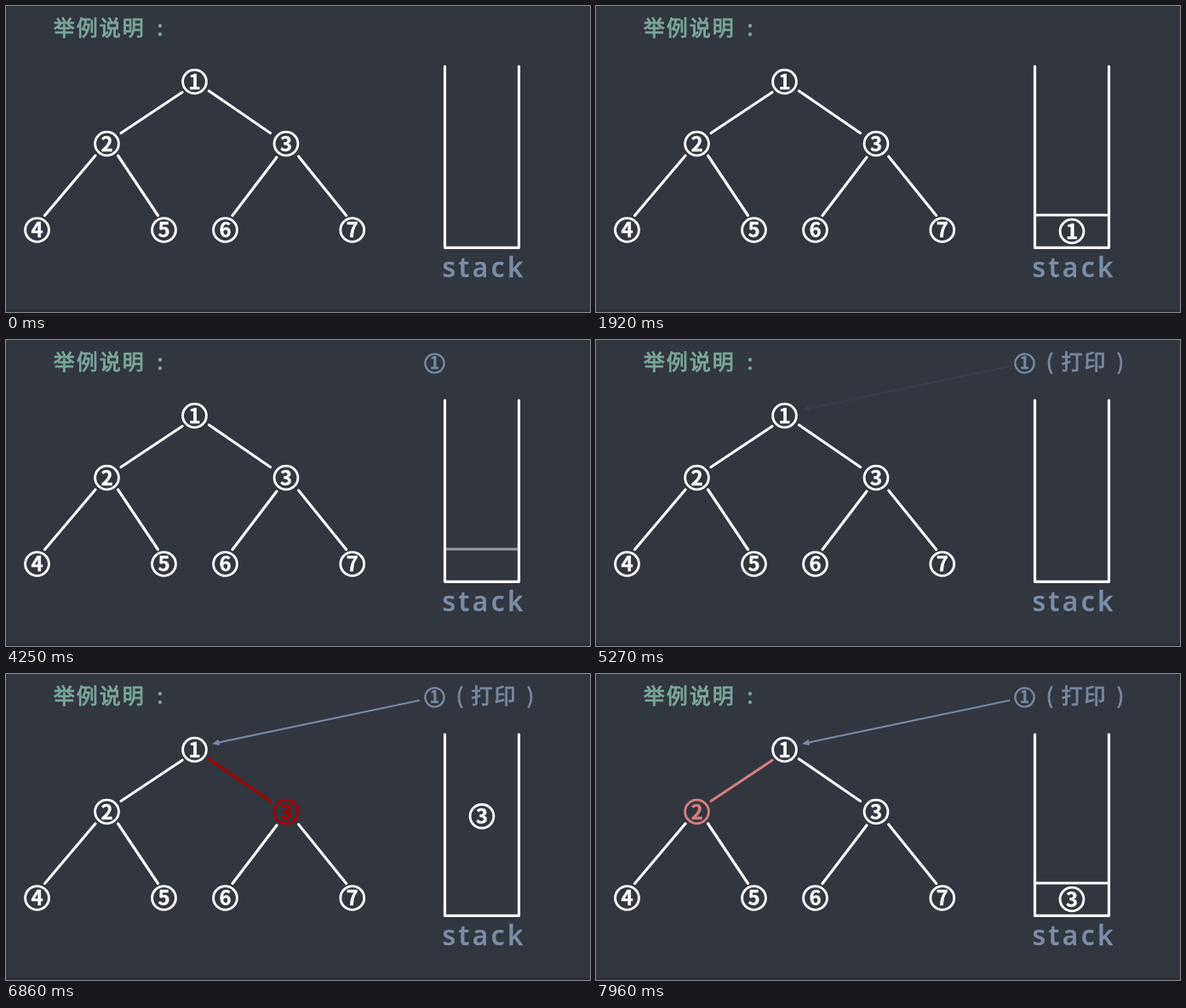
Animation of 686 by 360 pixels, one loop 8000 ms. Source, as an HTML page:

```html
<!DOCTYPE html>
<html lang="zh-CN">
<head>
<meta charset="utf-8">
<title>Tree traversal with a stack</title>
<style>
  html, body { margin: 0; width: 100%; height: 100%; overflow: hidden; background: #32363f; }
  svg { display: block; width: 100%; height: 100%; }
  text { font-family: "Noto Sans CJK SC", "Noto Sans CJK", "Noto Sans", sans-serif; }
  .digit { font-weight: 700; text-anchor: middle; stroke-width: .4; }
  .edge { stroke-width: 3.2; stroke-linecap: round; }
  .label { font-size: 25px; letter-spacing: 2px; stroke-width: .9; }
  .mid { text-anchor: middle; letter-spacing: 0; }
  #title { fill: #7ba79b; stroke: #7ba79b; }
  #print, #arrow { fill: #7588a0; stroke: #7588a0; }
  #stack { font: 600 32px "Open Sans", "Noto Sans", sans-serif; letter-spacing: 3.5px; fill: #7b8da5; stroke: #7b8da5; stroke-width: .4; }
</style>
</head>
<body>
<svg viewBox="0 0 686 360">
  <rect y="357" width="686" height="3" fill="#2d3037"/>
  <g id="title" class="label">
    <text x="55.7" y="35">举例说明</text>
    <text class="mid" x="181" y="34.5">:</text>
  </g>
  <g id="tree"></g>
  <path d="M515.5 71V284.3H602.5V71" fill="none" stroke="#fff" stroke-width="3.2" stroke-linecap="round" stroke-linejoin="round"/>
  <path id="divider" d="M516 246H602" stroke="#fff" stroke-width="3.2"/>
  <text id="stack" x="512.5" y="319">stack</text>
  <g id="arrow">
    <path d="M486 31L247 81.2" stroke-width="2.2"/>
    <path d="M242 82.3L249.5 76.8L251 84Z" stroke="none"/>
  </g>
  <g id="print" class="label">
    <text class="mid" x="533" y="35">(</text>
    <text x="546.5" y="35">打印</text>
    <text class="mid" x="616" y="35">)</text>
  </g>
  <g id="balls"></g>
</svg>
<script>
const LOOP = 8000;
const WHITE = [255, 255, 255], RED = [168, 0, 0], BLUE = [117, 136, 160];
const SLOT = [559, 265], PRINTED = [503.5, 27.5];
const $ = id => document.getElementById(id);

function add(parent, tag, attrs, text = "") {
  const el = document.createElementNS("http://www.w3.org/2000/svg", tag);
  for (const key in attrs) el.setAttribute(key, attrs[key]);
  el.textContent = text;
  return parent.appendChild(el);
}

function circled(parent, digit, x, y) {
  const g = add(parent, "g", { transform: `translate(${x} ${y})` });
  add(g, "circle", { r: 13.9, fill: "none", "stroke-width": 2.9 });
  add(g, "text", { class: "digit", y: 8.6, "font-size": 24 }, digit);
  return g;
}

const tint = (el, color) => {
  el.setAttribute("fill", color);
  el.setAttribute("stroke", color);
};
const mix = (a, b, k) => `rgb(${a.map((v, i) => Math.round(v + (b[i] - v) * k))})`;
const ramp = (t, from, to) => Math.min(1, Math.max(0, (t - from) / (to - from)));
const ease = k => k * k * (3 - 2 * k);
const fade = (t, from, to) => ease(ramp(t, from, to));

const nodes = [[221.5, 89], [118.5, 162], [329, 162], [36.5, 263.5], [185.5, 263.5], [257.5, 263.5], [406.8, 263.5]];
// Edge into each node from 2 to 7.
const edges = [
  [207, 101.5, 135, 149.5], [238.5, 100, 310.5, 149.5],
  [105, 176, 45.5, 246.5], [131.5, 176, 178.5, 246.5],
  [318, 178, 266, 246.5], [343.7, 177, 399.7, 246.5]
].map(([x1, y1, x2, y2]) => add($("tree"), "line", { class: "edge", x1, y1, x2, y2, stroke: "#fff" }));
const rings = nodes.map(([x, y], i) => circled($("tree"), i + 1, x, y));
rings.forEach(ring => tint(ring, "#fff"));

const ball1 = circled($("balls"), 1, ...SLOT);
const ball3 = circled($("balls"), 3, ...SLOT);
tint(ball3, "#fff");

function place(ball, [x, y], opacity, scale = 1) {
  ball.setAttribute("transform", `translate(${x} ${y}) scale(${scale})`);
  ball.setAttribute("opacity", opacity);
}

const dropAt = k => [SLOT[0], 60 + (SLOT[1] - 60) * k];

function popAt(k) {
  const bend = [619, 54], j = 1 - k;
  return SLOT.map((v, i) => j * j * v + 2 * j * k * bend[i] + k * k * PRINTED[i]);
}

function highlight(n, amount) {
  const color = mix(WHITE, RED, amount);
  tint(rings[n - 1], color);
  edges[n - 2].setAttribute("stroke", color);
}

function draw(t) {
  const pop = fade(t, 3050, 3990);
  const settle = ramp(t, 3700, 4100);
  place(ball1, pop > 0 ? popAt(pop) : dropAt(fade(t, 700, 1500)), ramp(t, 700, 900), 1 - .2 * settle);
  tint(ball1, mix(WHITE, BLUE, settle));
  place(ball3, dropAt(fade(t, 6500, 7200)), ramp(t, 6500, 6700));

  $("divider").setAttribute("opacity",
    fade(t, 1300, 1600) - fade(t, 4050, 4450) + fade(t, 6950, 7250));
  $("print").setAttribute("opacity", fade(t, 4350, 4800));
  $("arrow").setAttribute("opacity", ramp(t, 5230, 5650));

  highlight(3, ramp(t, 5850, 6200) - ramp(t, 7230, 7730));
  highlight(2, ramp(t, 7760, 8160));
}

function tick() {
  draw(performance.now() % LOOP);
  requestAnimationFrame(tick);
}
tick();
</script>
</body>
</html>
```
